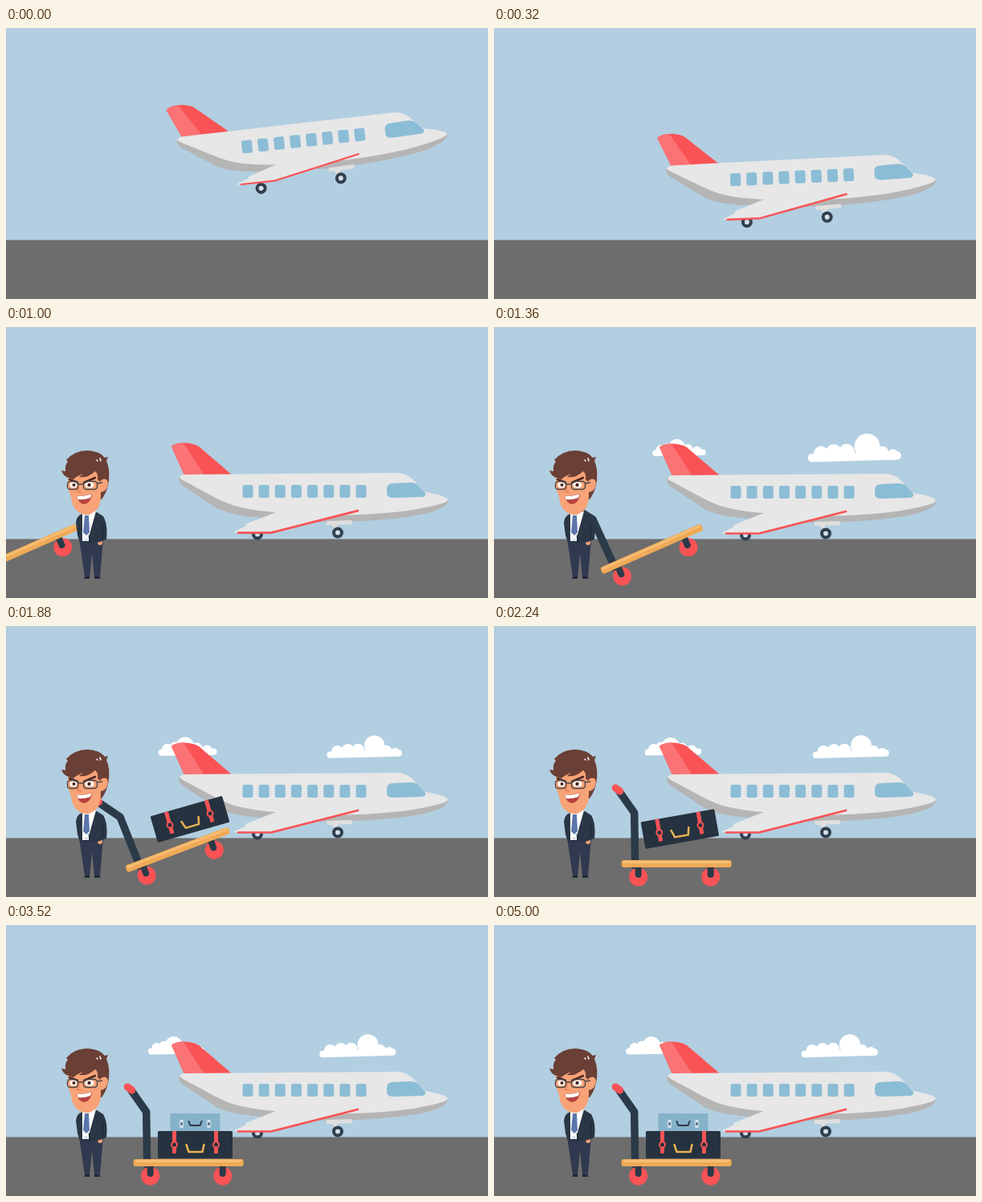
Recreate the animation shown at these times as an HTML page. Size 600x338 px, loop 5040 ms.

```html
<!DOCTYPE html>
<html lang="en">
<head>
<meta charset="utf-8">
<style>
html, body { margin: 0; width: 100%; height: 100%; overflow: hidden; background: #b2cee1; }
svg { display: block; width: 100%; height: 100%; }
.line { fill: none; stroke-linecap: round; stroke-linejoin: round; }
</style>
</head>
<body>
<svg viewBox="0 0 600 338">
  <rect width="600" height="338" fill="#b2cee1"/>
  <rect y="264.500" width="600" height="74" fill="#6d6d6d"/>

  <g id="cloudL" fill="#fff">
    <rect x="-35" y="2" width="70" height="8" rx="4"/>
    <circle cx="-24" cy="2" r="6.500"/><circle cx="-15" cy="0" r="6.500"/>
    <circle cx="-3" cy="-1" r="11"/><circle cx="11" cy="2" r="7"/><circle cx="23" cy="4" r="6"/>
  </g>
  <g id="cloudR" fill="#fff">
    <rect x="-47.500" y="5" width="95" height="8.500" rx="4"/>
    <circle cx="-34" cy="5" r="7.500"/><circle cx="-21" cy="4" r="8"/><circle cx="-8" cy="4" r="8"/>
    <circle cx="13" cy="-1" r="13"/><circle cx="28" cy="6" r="7"/><circle cx="39" cy="8" r="5.500"/>
  </g>

  <g id="plane">
    <path fill="#f95355" d="M206 150Q210 146 218 145.500Q232 145 240 150L282 186H222Z"/>
    <path fill="#fb7375" d="M206 150Q210 146 221 145.500L247 186H222Z"/>
    <path fill="#b5b5b5" d="M216 188Q213 194 220 199L262 227Q282 237 320 239L400 244Q478 243 521 234Q552 226 550 217Z"/>
    <path fill="#e7e7e7" d="M216 189Q217 185 224 185L486 183Q498 183 506 191L522 207Q542 210 549 215Q552 218 543 221Q500 234 420 235.500Q330 235 293 226Q278 223 261 214L220 192Z"/>
    <path fill="#8cbdd6" d="M474 208V203Q474 196 482 196L503 195Q510 195 514 199L522 208Q523 213 517 213L482 214Q474 214 474 208Z"/>
    <g id="windows" fill="#8cbdd6"></g>
    <path fill="#dedede" d="M399 243L431 242V247L412 248L414 252H409L405 248H399Z"/>
    <circle cx="413" cy="257.500" r="5" fill="#d5e0e7" stroke="#313f4e" stroke-width="4"/>
    <circle cx="313" cy="259.500" r="5" fill="#d5e0e7" stroke="#313f4e" stroke-width="4"/>
    <g id="wing">
      <path fill="#e7e7e7" d="M283 257L299 249L298 247L336 232L438 229L331 258H290Z"/>
      <path class="line" stroke="#f95355" stroke-width="2.700" d="M289 257.500L330 257.500L438 230"/>
    </g>
  </g>

  <g id="trolley">
    <path class="line" stroke="#2b3a49" stroke-width="9.500" d="M-4 -14L-5 -80L-24 -107"/>
    <path class="line" stroke="#f95355" stroke-width="9" d="M-28.500 -111L-23 -107"/>
    <circle r="11.500" fill="#f95355"/><circle cx="90" r="11.500" fill="#f95355"/>
    <path class="line" stroke="#2b3a49" stroke-width="8" d="M0 -14V-3M90 -14V-3"/>
    <rect x="-21" y="-21" width="137" height="9" rx="3" fill="#efaa56"/>
    <rect x="-19" y="-20" width="133" height="3" rx="1.500" fill="#f6bd73"/>
  </g>

  <g id="black">
    <rect x="-46.500" y="-17" width="93" height="34" rx="1.500" fill="#26323f"/>
    <path stroke="#f95355" stroke-width="5" d="M-26 -17V11M26 -17V11"/>
    <g fill="#26323f" stroke="#f95355" stroke-width="2"><circle cx="-26" r="3.500"/><circle cx="26" r="3.500"/></g>
    <path class="line" stroke="#e8b154" stroke-width="2.500" d="M-11 0L-8 9H9L11 0"/>
  </g>
  <g id="teal">
    <rect x="-31" y="-11" width="62" height="22" rx="1.500" fill="#86b2c9"/>
    <path stroke="#d9e6ed" stroke-width="4" d="M-17 -3V7M17 -3V7"/>
    <g fill="#587b90" stroke="#e6eef2"><circle cx="-17" cy="2" r="2.500"/><circle cx="17" cy="2" r="2.500"/></g>
    <path class="line" stroke="#2b3a49" stroke-width="2" d="M-8 -1L-6 4H6L8 -1"/>
  </g>

  <g id="man">
    <path fill="#30394f" d="M91 264H121L117 312H110L107 282L104 312H98Z"/>
    <path fill="#1f2733" d="M97 314Q97 311 104 311V314ZM110 314V311Q117 311 118 314Z"/>
    <circle cx="117" cy="269" r="3" fill="#f7a377"/>
    <path fill="#2a3645" d="M95 233Q88 235 87 244L89 260L92 269H114L125 265Q127 246 121 236L113 231Z"/>
    <path fill="#fff" d="M95 233L112 230L103 262V267H95Z"/>
    <path fill="#5b76ab" d="M98 235H103L104 256L100 260L96 256Z"/>
    <path stroke="#d9dde2" stroke-width="3" d="M98 265H102"/>
    <path class="line" stroke="#1b2633" d="M103 260L105 269M121 247L120 264"/>
    <path fill="#6a3f35" d="M112 178H128Q130 200 119 215H112Z"/>
    <path fill="#f7a377" d="M77 184L114 180L116 192Q126 186 127 195Q126 205 118 206Q119 222 112 229L104 234Q95 235 89 230Q82 224 81 212L77 201Z"/>
    <path fill="#6a3f35" d="M78 188Q72 187 69 179L74 180Q73 172 77 168L75 166Q85 154 102 154Q117 155 123 163L127 162L125 167Q130 178 127 191Q121 186 117 193L114 190Q115 183 111 180Q101 189 91 187L96 183Q88 186 84 190Z"/>
    <path class="line" stroke="#fff" stroke-width="1.500" d="M113 166L114 167M117 164L118 167"/>
    <path class="line" stroke="#4b2722" stroke-width="2.500" d="M79 190L89 194M97 194L111 188"/>
    <g fill="#fff"><ellipse cx="84" cy="197" rx="4.500" ry="3.500"/><ellipse cx="104" cy="197" rx="5.500" ry="3.800"/></g>
    <g fill="#4b2722"><circle cx="84.500" cy="197" r="2"/><circle cx="103.500" cy="197" r="2.200"/></g>
    <g fill="none" stroke="#4a4547" stroke-width="1.400">
      <rect x="76.500" y="192.500" width="13" height="10" rx="3.500"/>
      <rect x="96.500" y="192.500" width="17" height="10" rx="3.500"/>
      <path d="M89.500 196H96.500M113.500 195L120 194"/>
    </g>
    <path class="line" stroke="#dc8058" stroke-width="1.300" d="M91 199L89 205L93 206"/>
    <path fill="#b7423f" d="M88 211Q97 211 107 208Q106 220 97 221Q90 220 88 211Z"/>
    <path fill="#fff" d="M88.500 211Q97 211 106.500 208.500L105 213Q97 216 89.500 215Z"/>
  </g>
</svg>
<script>
const LOOP = 5040, STEP = 40;
const el = id => document.getElementById(id);
const clamp = x => Math.max(0, Math.min(1, x));
const progress = (t, start, length) => clamp((t - start) / length);
const smooth = u => u * u * (3 - 2 * u);
const backOut = u => 1 + 2.7 * (u - 1) ** 3 + 1.7 * (u - 1) ** 2;

function bounceOut(u) {
  const n = 7.5625, d = 2.75;
  if (u < 1 / d) return n * u * u;
  if (u < 2 / d) return n * (u - 1.5 / d) ** 2 + .75;
  if (u < 2.5 / d) return n * (u - 2.25 / d) ** 2 + .9375;
  return n * (u - 2.625 / d) ** 2 + .984375;
}

function elastic(t, start) {
  const u = (t - start) / 1000;
  return u < 0 ? 0 : 1 - Math.exp(-5 * u) * Math.cos(5 * Math.PI * u);
}

function place(id, x, y, angle = 0, scale = 1) {
  el(id).setAttribute('transform', `translate(${x} ${y}) rotate(${angle}) scale(${scale})`);
}

for (let i = 0; i < 8; i++) {
  const x = 294.5 + i * 20.15;
  el('windows').innerHTML += `<rect x="${x}" y="198" width="13" height="16" rx="2.5"/>`;
}

function draw(t) {
  // Plane drops, bounces on its wheels and levels out
  const landing = progress(t, 0, 1045);
  const pitch = (1 - landing) ** 2.5;
  const height = 58 * (1 - bounceOut(landing));
  el('plane').setAttribute('transform',
    `translate(${301 - pitch} ${206 - height}) rotate(${-6.1 * pitch}) translate(-301 -206)`);
  el('wing').setAttribute('transform',
    `translate(0 230) scale(1 ${1 - .2 * pitch}) translate(0 -230)`);

  const left = LOOP - STEP - t;
  place('cloudL', 199 + left * .00865, 151, -1, elastic(t, 1265));
  place('cloudR', 430 + left * .0051, 150.5, -1.5, elastic(t, 1115));

  el('man').setAttribute('visibility', t < 600 ? 'hidden' : 'visible');

  // Trolley rolls in tilted, then is set down
  const roll = 1 - 2 ** (-10 * progress(t, 920, 1000));
  const down = smooth(progress(t, 1780, 460));
  place('trolley', -150 + 325 * roll + 5 * down, 311 + 2 * down, -23.7 * (1 - down));

  // Cases pop up and float down onto the deck
  const lift = clamp((2860 - t) / 980);
  place('black', 235.5 - 6.5 * lift, 274 - 33 * lift, -16 * lift, backOut(progress(t, 1680, 180)));
  place('teal', 235.5, 246 - 10 * lift, 0, backOut(progress(t, 2440, 240)));
}

function frame() {
  draw(Math.floor(performance.now() % LOOP / STEP) * STEP);
  requestAnimationFrame(frame);
}
frame();
</script>
</body>
</html>
```
